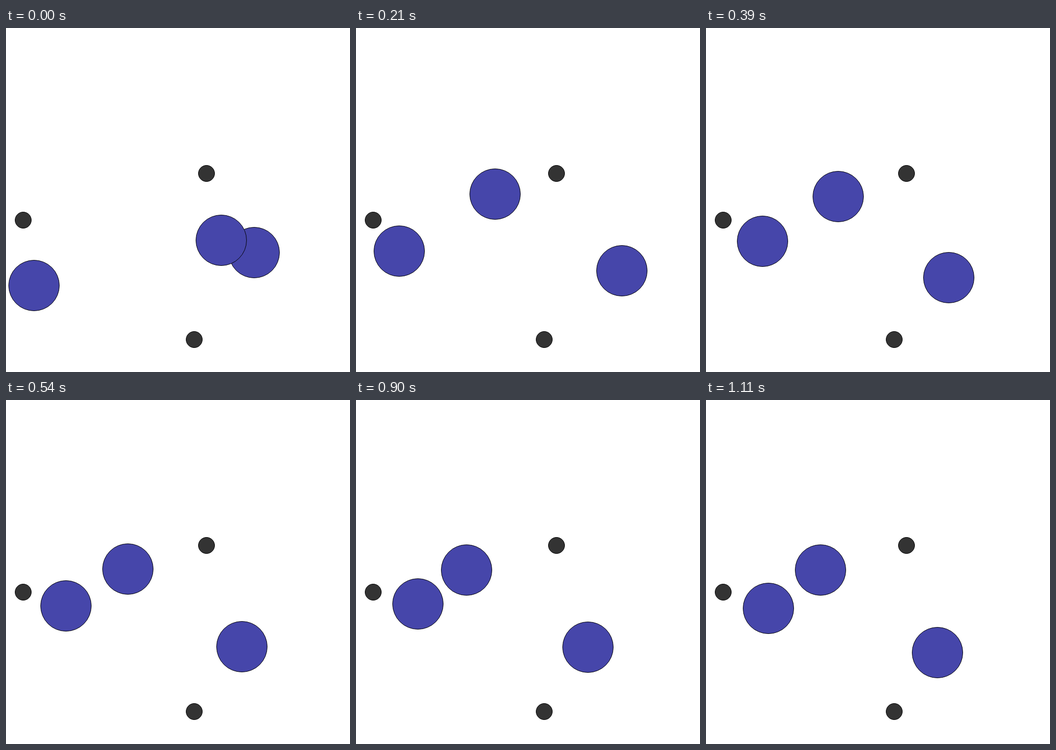
An HTML page with a canvas for the animation above (1170 ms loop, 700 by 700 pixels).

```html
<!DOCTYPE html>
<html>
<head>
<meta charset="utf-8">
<title>Settling discs</title>
<style>
  html, body { margin: 0; height: 100%; overflow: hidden; background: #fff; }
  canvas { display: block; }
</style>
</head>
<body>
<canvas id="stage" width="700" height="700"></canvas>
<script>
const ctx = document.getElementById('stage').getContext('2d');
const LOOP = 1170, TICK = 30, DECAY = 0.33;
const pins = [[35, 391], [408, 296], [383, 634]];

// Poses are flat lists: x, y of the left, right and middle disc.
const start = [57, 524, 505, 457, 438, 432];

// Each round pulls the discs in, then relaxes them; both poses converge.
const pull = {
  first: [85, 448, 541, 485, 312, 338],
  rest: [126.4, 414.6, 471.2, 503.2, 222.2, 346],
  offset: [-13.3, 13.3, 26.7, -3.6, 78, -6]
};
const relax = {
  first: [88, 454, 541, 494, 283, 338],
  rest: [127.49, 424.1, 471, 514, 232.8, 346],
  offset: [-12, 10, 22.6, -6, 36, -3]
};

function settle(phase, round) {
  if (round === 0) return phase.first;
  return phase.rest.map((v, i) => v + phase.offset[i] * DECAY ** (round - 1));
}

function poseAt(ms) {
  const tick = Math.floor(ms / TICK) - 3;
  if (tick < 0) return start;
  const round = Math.floor(tick / 6), step = tick % 6;
  if (step > 3) return settle(relax, round);
  const from = round ? settle(relax, round - 1) : start;
  const to = settle(pull, round);
  const mix = [1, 2, 2, 3][step] / 3;
  return from.map((v, i) => v + (to[i] - v) * mix);
}

function disc(x, y, r, fill) {
  ctx.beginPath();
  ctx.arc(Math.round(x), Math.round(y), r, 0, 2 * Math.PI);
  ctx.fillStyle = fill;
  ctx.fill();
  ctx.stroke();
}

function draw() {
  const pose = poseAt(performance.now() % LOOP);
  ctx.clearRect(0, 0, 700, 700);
  for (const [x, y] of pins) disc(x, y, 16.5, '#333');
  for (let i = 0; i < 6; i += 2) disc(pose[i], pose[i + 1], 51.5, '#4646aa');
  requestAnimationFrame(draw);
}
draw();
</script>
</body>
</html>
```
